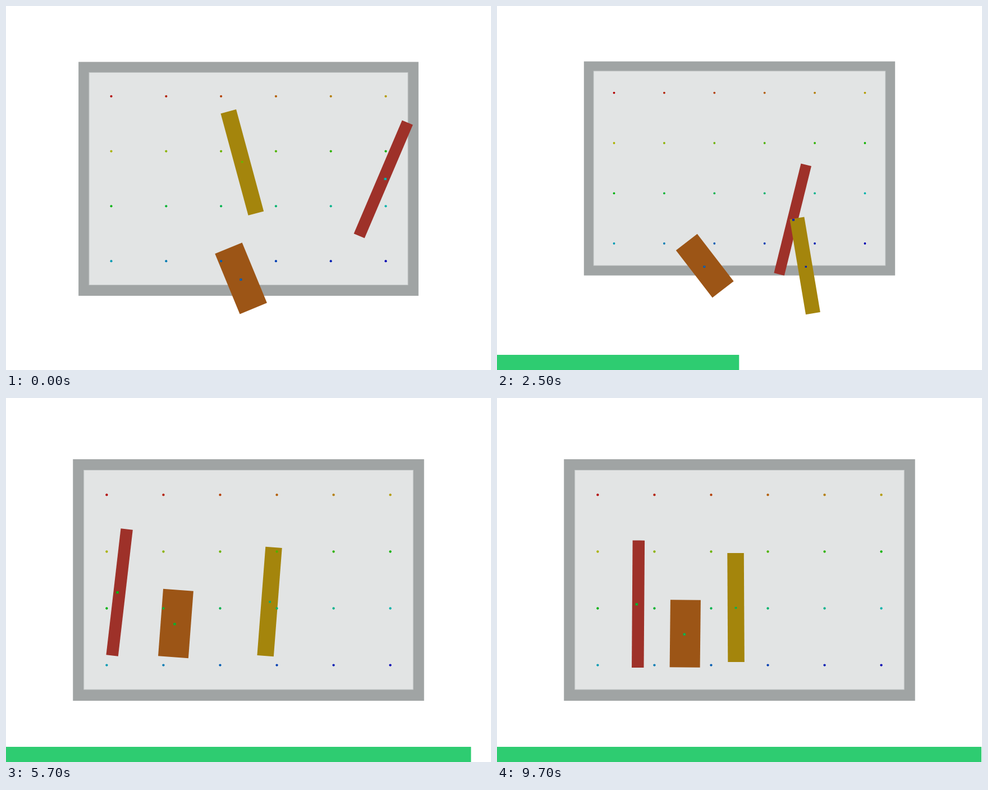
Animation of 864x648 px, one loop 9.8 s. Source, as an HTML page:

```html
<!DOCTYPE html>
<html lang="en">
<head>
<meta charset="utf-8">
<title>Settling blocks</title>
<style>
html, body { margin: 0; width: 100%; height: 100%; overflow: hidden; background: #fff; }
svg { display: block; width: 100%; height: 100%; }
</style>
</head>
<body>
<svg id="stage" viewBox="0 0 864 648">
  <rect width="864" height="648" fill="#fff"/>
  <g id="world">
    <rect width="625.5" height="430" fill="#a0a4a4"/>
    <rect x="19.5" y="19.5" width="586.5" height="390.5" fill="#e2e4e4" stroke="#c4c8c8" stroke-width="1"/>
  </g>
  <g id="dots"></g>
  <rect id="bar" y="621" height="27" fill="#2ecc71"/>
</svg>
<script>
const LOOP = 9800, STEP = 100, FAST_END = 47;
const BOARD = { w: 625.5, h: 430, rim: 19.5 };
const PAD = 10.7, FIT = { w: 646.9, h: 469.7 };
const MID = { x: 432, y: 324 };
const COLS = 6, ROWS = 4, GAP = 99.5;

// Each key: step, centre x, centre y, angle in degrees
const blocks = [
  { w: 21.5, h: 226.5, fill: '#9e3129', mark: 4.6, keys: [
    [0, 560.8, 215.7, 23.1], [19, 525.2, 196.4, 27.75], [32, 250.5, 410.5, 17.7],
    [41, 145, 278, 9.2], [50, 41, 228, 9], [57, 82.9, 237, 6.6], [65, 86, 226, 4],
    [75, 104, 211, 2], [81, 127.8, 234.5, -0.25], [87, 112, 228, 1],
    [93, 102, 256, 1], [97, 132.3, 257.8, 0.4]] },
  { w: 54, h: 120, fill: '#9c5516', mark: 4.4, keys: [
    [0, 298.9, 397.9, -22.4], [19, 82.1, 410, -37.5], [32, 397.7, 301.2, -28.7],
    [41, 208.5, 366.5, 18], [50, 200, 320, 8], [57, 183.2, 292.5, 4.3],
    [81, 208.3, 278.5, 0.3], [97, 216, 310.5, 0.6]] },
  { w: 29.5, h: 194, fill: '#a4850c', mark: 3.8, keys: [
    [0, 301.2, 184.8, -15.15], [19, 355.3, 401.4, 2.47], [32, 475.9, 410.5, -27.4],
    [41, 459.8, 301.3, 11.65], [50, 390, 270, 8], [57, 350.3, 253.5, 4.4],
    [81, 286.8, 257.5, 1.04], [97, 306.3, 264, -0.3]] }
];

const $ = id => document.getElementById(id);
const clamp = (v, lo, hi) => Math.min(hi, Math.max(lo, v));
const mix = (a, b, u) => a + (b - a) * u;

function add(parent, tag, attrs) {
  const el = document.createElementNS('http://www.w3.org/2000/svg', tag);
  for (const k in attrs) el.setAttribute(k, attrs[k]);
  return parent.appendChild(el);
}

function noise(n, seed) {
  const v = Math.sin(n * 12.9898 + seed * 78.233) * 43758.5453;
  return (v - Math.floor(v)) * 2 - 1;
}

const hue = (col, row) => `hsl(${(row * COLS + col) * 240 / 23},100%,35%)`;

const grid = [];
for (let row = 0; row < ROWS; row++) {
  for (let col = 0; col < COLS; col++) {
    grid.push({
      x: BOARD.w / 2 + (col - 2.5) * GAP,
      y: BOARD.h / 2 + (row - 1.5) * GAP,
      el: add($('dots'), 'circle', { fill: hue(col, row) })
    });
  }
}
for (const b of blocks) {
  b.el = add($('world'), 'rect', { x: -b.w / 2, y: -b.h / 2, width: b.w, height: b.h, fill: b.fill });
  b.dot = add($('dots'), 'rect', {});
}

// Fast wandering early on, slow settling afterwards
function pose(b, i, n) {
  const keys = b.keys;
  let k = 0;
  while (k < keys.length - 2 && keys[k + 1][0] <= n) k++;
  const p = keys[k], q = keys[k + 1];
  const u = (n - p[0]) / (q[0] - p[0]);
  const e = (1 - Math.cos(Math.PI * u)) / 2;
  const near = Math.min(n - p[0], q[0] - n);
  const amp = n <= FAST_END ? Math.min(1, near / 3) * (1 - n / 90) : 0;
  const wander = c => (noise(n, i * 3 + c) + noise(n - 1, i * 3 + c)) / 2 * amp;
  const r = BOARD.rim;
  return {
    x: clamp(mix(p[1], q[1], e) + 130 * wander(1), r, BOARD.w - r),
    y: clamp(mix(p[2], q[2], e) + 130 * wander(2), r, BOARD.h - r),
    a: mix(p[3], q[3], e) + 18 * wander(3)
  };
}

// Scale and shift that keep the board and all blocks in view
function view(poses) {
  let x0 = 0, y0 = 0, x1 = BOARD.w, y1 = BOARD.h;
  poses.forEach((p, i) => {
    const b = blocks[i], t = p.a * Math.PI / 180;
    const c = Math.abs(Math.cos(t)), s = Math.abs(Math.sin(t));
    const hw = (b.w * c + b.h * s) / 2, hh = (b.w * s + b.h * c) / 2;
    x0 = Math.min(x0, p.x - hw);
    x1 = Math.max(x1, p.x + hw);
    y0 = Math.min(y0, p.y - hh);
    y1 = Math.max(y1, p.y + hh);
  });
  const s = Math.min(FIT.w / (x1 - x0 + 2 * PAD), FIT.h / (y1 - y0 + 2 * PAD));
  return { s, x: MID.x - s * (x0 + x1) / 2, y: MID.y - s * (y0 + y1) / 2 };
}

function draw(ms) {
  const n = Math.floor((ms % LOOP) / STEP);
  const poses = blocks.map((b, i) => pose(b, i, n));
  const v = view(poses);
  $('world').setAttribute('transform', `translate(${v.x} ${v.y}) scale(${v.s})`);

  // Dots float a little above the board
  const lift = 1 / (1 - 0.0153 * v.s);
  const raise = p => [
    MID.x + (v.x + p.x * v.s - MID.x) * lift,
    MID.y + (v.y + p.y * v.s - MID.y) * lift
  ];
  for (const g of grid) {
    const [x, y] = raise(g);
    g.el.setAttribute('cx', x);
    g.el.setAttribute('cy', y);
    g.el.setAttribute('r', 2.15 * v.s);
  }
  poses.forEach((p, i) => {
    const b = blocks[i], size = b.mark * v.s, [x, y] = raise(p);
    b.el.setAttribute('transform', `translate(${p.x} ${p.y}) rotate(${p.a})`);
    const col = clamp(Math.round((p.x - BOARD.w / 2) / GAP + 2.5), 0, COLS - 1);
    const row = clamp(Math.round((p.y - BOARD.h / 2) / GAP + 1.5), 0, ROWS - 1);
    b.dot.setAttribute('x', x - size / 2);
    b.dot.setAttribute('y', y - size / 2);
    b.dot.setAttribute('width', size);
    b.dot.setAttribute('height', size * 0.9);
    b.dot.setAttribute('fill', hue(col, row));
  });

  $('bar').setAttribute('width', n <= FAST_END ? n * 17.25 : 828.4 + (n - 57) * 0.864);
}

const start = performance.now();
function tick() {
  draw(performance.now() - start);
  requestAnimationFrame(tick);
}
tick();
</script>
</body>
</html>
```
